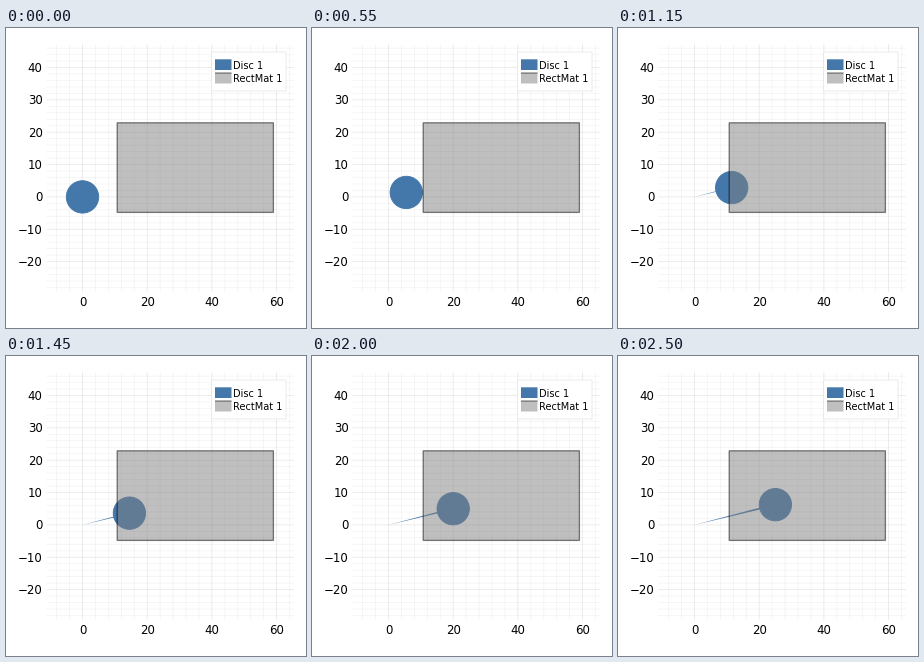
A matplotlib script that plays this animation: 300 by 300 pixels, repeating every 2550 ms.

```python
import numpy as np
import matplotlib.pyplot as plt
from matplotlib.animation import FuncAnimation
from matplotlib.patches import Circle, Polygon, Rectangle

SIZE = 300
FRAMES, INTERVAL = 51, 50
X0, Y0, UNIT = 76.5, 168.9, 3.235      # pixel position of the data origin, pixels per unit
LEFT, RIGHT, TOP, BOTTOM = 40.5, 288, 16, 264
VELOCITY = np.array([0.5, 0.125])      # units per frame
RADIUS = 5
TAIL_SPREAD = 0.014                    # half width of the tail per unit of length
BLUE = "#4477aa"
GRAY = (0.5, 0.5, 0.5, 0.5)
EDGE = (0, 0, 0, 0.5)

plt.rcParams["font.family"] = "DejaVu Sans"
fig = plt.figure(figsize=(SIZE / 72, SIZE / 72), dpi=72, facecolor="white")
ax = fig.add_axes([0, 0, 1, 1])
ax.set_xlim(0, SIZE)
ax.set_ylim(SIZE, 0)
ax.axis("off")


def to_px(x, y):
    return X0 + UNIT * x, Y0 - UNIT * y


def add_box(x, y, w, h, **style):
    box = Rectangle((x, y), w, h, snap=False, **style)
    return ax.add_patch(box)


def grid_line(xs, ys, major):
    ax.plot(xs, ys, color="black", alpha=0.1 if major else 0.05,
            lw=0.7, zorder=1, snap=False, solid_capstyle="butt")


def draw_grid():
    for x in range(-8, 66, 4):
        px = to_px(x, 0)[0]
        grid_line([px, px], [TOP, BOTTOM], x % 20 == 0)
    for y in range(-28, 48, 2):
        py = to_px(0, y)[1]
        grid_line([LEFT, RIGHT], [py, py], y % 10 == 0)


def draw_ticks():
    for x in range(0, 61, 20):
        ax.text(to_px(x, 0)[0], 277.8, str(x), size=11.7, ha="center", va="baseline")
    for y in range(-20, 41, 10):
        label = str(y).replace("-", "\u2212")
        ax.text(36.6, to_px(0, y)[1] + 4.5, label, size=11.7, ha="right", va="baseline")


def draw_legend():
    add_box(205.5, 24, 74.5, 39, fc="white", ec="#e3e3e3", lw=0.7, zorder=5)
    add_box(209, 31.3, 16.5, 10.7, fc=BLUE, ec="none", zorder=6)
    add_box(209, 45, 16.5, 10.5, fc=GRAY, ec="none", zorder=6)
    ax.plot([209, 225.5], [45, 45], color=EDGE, lw=1.2, zorder=6,
            solid_capstyle="butt", snap=False)
    ax.text(227, 40.6, "Disc 1", size=9.8, va="baseline", zorder=6)
    ax.text(227, 54.2, "RectMat 1", size=9.8, va="baseline", zorder=6)


draw_grid()
draw_ticks()
draw_legend()

disc = Circle((X0, Y0), RADIUS * UNIT, fc=BLUE, ec=BLUE, lw=0.9, zorder=3)
tail = Polygon(np.full((3, 2), [X0, Y0]), fc=BLUE, ec="none", zorder=2, snap=False)
ax.add_patch(disc)
ax.add_patch(tail)
add_box(111.2, 94.8, 156.2, 89.6, fc=GRAY, ec=EDGE, lw=1.3, zorder=4)


def update(frame):
    x, y = VELOCITY * frame
    disc.center = to_px(x, y)
    dx, dy = -y * TAIL_SPREAD, x * TAIL_SPREAD
    tail.set_xy([to_px(0, 0), to_px(x + dx, y + dy), to_px(x - dx, y - dy)])
    return disc, tail


anim = FuncAnimation(fig, update, frames=FRAMES, interval=INTERVAL,
                     repeat=True, repeat_delay=0, blit=False)
plt.show()
```
